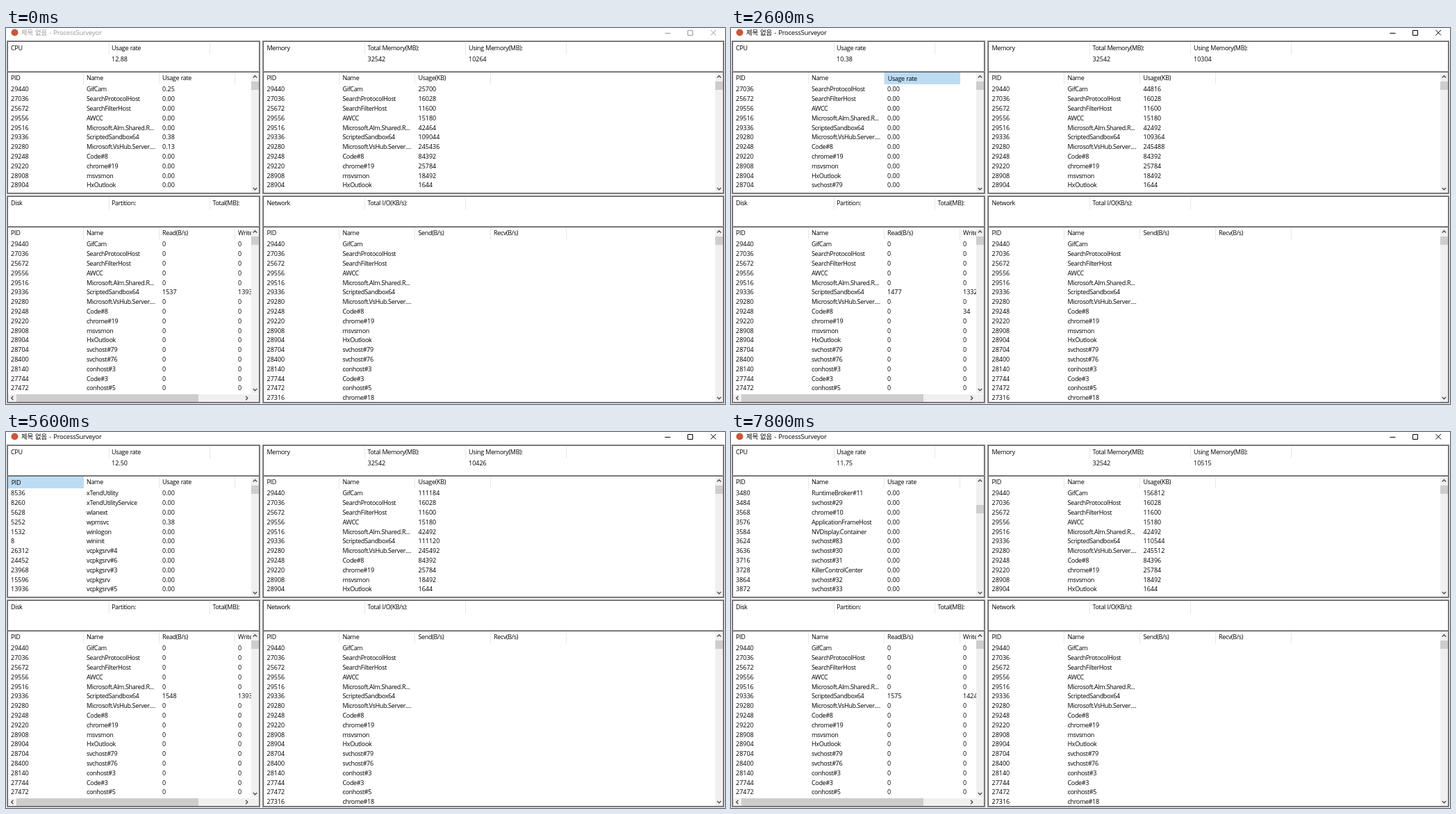
An HTML page that plays this animation: 1035 by 541 pixels, repeating every 8000 ms.

```html
<!DOCTYPE html>
<html lang="ko">
<head>
<meta charset="utf-8">
<title>ProcessSurveyor</title>
<style>
  html, body { margin: 0; width: 100%; height: 100%; overflow: hidden; background: #fff; }
  svg { display: block; width: 1035px; height: 541px; }
  text { font: 9px "Open Sans", "Noto Sans CJK KR", "Noto Sans CJK", sans-serif; fill: #000; letter-spacing: -.34px; word-spacing: .5px; white-space: pre; }
  text.num { letter-spacing: 0; }
  text.title { font-size: 9.4px; fill: inherit; letter-spacing: -.2px; word-spacing: 1px; }
</style>
</head>
<body>
<svg id="stage" viewBox="0 0 1035 541"></svg>
<script>
const LOOP = 8000, PITCH = 13.8;
const LEFT = [7, 116, 225, 334], RIGHT = [375.5, 484.5, 593.5, 702];

const parse = s => s.split('|').map(r => r.split(' '));

const procs = parse('29440 GifCam|27036 SearchProtocolHost|25672 SearchFilterHost|29556 AWCC|' +
  '29516 Microsoft.Alm.Shared.R...|29336 ScriptedSandbox64|29280 Microsoft.VsHub.Server....|' +
  '29248 Code#8|29220 chrome#19|28908 msvsmon|28904 HxOutlook|28704 svchost#79|28400 svchost#76|' +
  '28140 conhost#3|27744 Code#3|27472 conhost#5|27316 chrome#18');

const byPid = parse('0 _Total|4 System|8 wininit|172 Registry|660 smss|968 csrss#1|980 csrss|' +
  '992 svchost#64|1068 services|1088 lsass|1144 VsHub');
for (let i = 0; i < 38; i++) byPid.push([String(1160 + Math.floor(i * 15.4) * 4), 'svchost#' + (i % 29 || 65)]);
byPid.push(...parse('3480 RuntimeBroker#11|3484 svchost#29|3568 chrome#10|3576 ApplicationFrameHost|' +
  '3584 NVDisplay.Container|3624 svchost#83|3636 svchost#30|3716 svchost#31|3728 KillerControlCenter|' +
  '3864 svchost#32|3872 svchost#33|3880 svchost#34'));

const lists = {
  start: procs,
  usageUp: procs.slice(1),
  usageDown: [...parse('0 _Total|29440 GifCam|29336 ScriptedSandbox64|968 csrss#1'),
    ...procs.slice(1).filter(p => p[1] !== 'ScriptedSandbox64')],
  nameUp: parse('29556 AWCC|19924 AWCC.Background.Server|19804 ASDSvc#1|17088 AWCC.Service|12640 ACSCSRV|' +
    '10840 AnySign4PC|5972 AnySign4PCLauncher|5004 ASDSvc|3576 ApplicationFrameHost|29248 Code#8|' +
    '27744 Code#3|27160 Code#5'),
  nameDown: parse('8536 xTendUtility|8260 xTendUtilityService|5628 wlanext|5252 wpmsvc|1532 winlogon|' +
    '8 wininit|26312 vcpkgsrv#4|24452 vcpkgsrv#6|23968 vcpkgsrv#3|15596 vcpkgsrv|13936 vcpkgsrv#5|12088 vcpkgsrv#2'),
  pid: byPid
};

// cpu, used memory, memory of five processes, disk read, disk write, Code#8 write
const ticks = [
  ['12.88', 10264, 25700, 42464, 109044, 245436, 84392, 1537, 1393, 0],
  ['8.38', 10279, 32372, 42516, 108476, 245484, 84392, 1538, 1386, 0],
  ['10.38', 10304, 44816, 42492, 109364, 245488, 84392, 1477, 1332, 34],
  ['11.25', 10345, 67916, 42492, 109352, 245488, 84392, 1530, 1388, 0],
  ['11.88', 10386, 90440, 42492, 109328, 245488, 84392, 3067, 1940, 0],
  ['12.50', 10426, 111184, 42492, 111120, 245492, 84392, 1548, 1393, 0],
  ['11.75', 10447, 127772, 42492, 110760, 245508, 84396, 1552, 1410, 36],
  ['11.75', 10515, 156812, 42492, 110544, 245512, 84396, 1575, 1424, 0]
];
const busy = [
  { GifCam: '0.25', ScriptedSandbox64: '0.38', 'Microsoft.VsHub.Server....': '0.13' },
  { GifCam: '0.25', ScriptedSandbox64: '0.13' },
  { GifCam: '0.25' },
  { GifCam: '0.38', ScriptedSandbox64: '0.25', 'csrss#1': '0.13' },
  {},
  { wpmsvc: '0.38', 'csrss#1': '0.13' },
  { System: '0.13', 'csrss#1': '0.25' },
  { System: '0.13', 'csrss#1': '0.25' }
];

// hot: highlighted column of the CPU list (-1 none), down: mouse pressed
const steps = [
  [0, { tick: 0, disk: 0, list: 'start', hot: -1, down: false, top: false, active: false, off: 0 }],
  [300, { tick: 1 }],
  [400, { disk: 1 }],
  [1100, { top: true }],
  [1500, { top: false }],
  [1600, { active: true }],
  [1700, { tick: 2, hot: 2 }],
  [1800, { disk: 2, down: true }],
  [2000, { list: 'usageUp', down: false }],
  [2600, { down: true }],
  [2700, { list: 'usageDown', down: false, tick: 3 }],
  [2800, { disk: 3 }],
  [3300, { hot: 1 }],
  [3700, { down: true }],
  [3800, { list: 'nameUp', down: false }],
  [3900, { tick: 4 }],
  [4000, { disk: 4 }],
  [4300, { down: true }],
  [4400, { list: 'nameDown', down: false }],
  [5100, { tick: 5, hot: 0 }],
  [5200, { disk: 5 }],
  [5600, { down: true }],
  [5700, { list: 'pid', down: false }],
  [6200, { tick: 6 }],
  [6300, { disk: 6 }],
  [6700, { hot: -1 }],
  [6800, { off: 7 }],
  [6900, { off: 14 }],
  [7200, { off: 21 }],
  [7300, { off: 28 }],
  [7500, { off: 35, tick: 7, disk: 7 }],
  [7700, { off: 42 }],
  [7800, { off: 49 }]
];

const text = (x, y, s, cls = /^[\d.]+$/.test(s) ? 'num' : '') =>
  `<text x="${x}" y="${y + 3.4}" class="${cls}">${s}</text>`;
const rect = (x, y, w, h, fill) => `<rect x="${x}" y="${y}" width="${w}" height="${h}" fill="${fill}"/>`;
const path = (d, stroke, w) => `<path d="${d}" fill="none" stroke="${stroke}" stroke-width="${w}"/>`;
const seps = (xs, y) => xs.map(x => rect(x, y, 1, 17, '#e7e7e7')).join('');
const labels = (xs, y, names) => names.map((n, i) => text(xs[i], y, n)).join('');

function arrow(x, y, turn) {
  return `<g transform="translate(${x} ${y}) rotate(${turn})">${path('M-2.7 1.4L0-1.3L2.7 1.4', '#4d4d4d', 1.4)}</g>`;
}

function vbar(x, y0, y1, thumb) {
  return rect(x, y0, 11, y1 - y0, '#f0f0f0') + rect(x, thumb, 11, 12, '#cdcdcd') +
    arrow(x + 5.5, y0 + 6, 0) + arrow(x + 5.5, y1 - 5.5, 180);
}

// two-tone sunken edge around a header box and the list below it
function panel(x, y, w, h) {
  const box = (top, height) => rect(x, top, w, height, '#939393') +
    rect(x + 1, top + 1, w - 2, height - 2, '#5f5f5f') + rect(x + 2, top + 2, w - 4, height - 4, '#fff');
  return box(y, 46) + box(y + 44, h - 44);
}

function rows(xs, y, count, clip, cells) {
  let out = '';
  for (let i = 0; i < count; i++)
    cells(i).forEach((c, k) => out += text(xs[k], +(y + i * PITCH).toFixed(1), String(c)));
  return `<g clip-path="url(#${clip})">${out}</g>`;
}

function titleBar(active) {
  const ink = active ? '#000' : '#999';
  return rect(0, 0, 1035, 18, '#fff') + '<circle cx="12.5" cy="6.5" r="5" fill="#c9573a"/>' +
    `<g fill="${ink}">${text(22, 6.5, '제목 없음 - ProcessSurveyor', 'title')}</g>` +
    path('M948.5 7.5h8M981.5 3.5h7v7h-7zM1014.5 3l7.5 7.5M1022 3l-7.5 7.5', ink, 1);
}

function cpuPanel(s) {
  const usage = p => p[1] === '_Total' ? ticks[s.tick][0] : busy[s.tick][p[1]] || '0.00';
  const list = lists[s.list].slice(s.off);
  let head = seps([111, 220, 329], 64);
  if (s.hot >= 0) head += rect(3 + s.hot * 109, 64, 109, 17, s.down ? '#bcdcf4' : '#d9ebf9');
  ['PID', 'Name', 'Usage rate'].forEach((n, i) => {
    const d = s.down && s.hot === i ? .7 : 0;
    head += text(LEFT[i] + d, 72 + d, n);
  });
  return panel(1, 18, 365, 221) + seps([148, 293], 21) +
    (s.top ? rect(148, 20, 145, 18, '#d9ebf9') : '') +
    text(7, 28.5, 'CPU') + text(152, 28.5, 'Usage rate') + text(152, 44.5, ticks[s.tick][0]) + head +
    rows(LEFT, 88, 12, 'cpuClip', i => [...list[i], usage(list[i])]) +
    vbar(353, 64, 237, 77 + s.off * 4 / 7);
}

function memoryPanel(s) {
  const [, used, cam, alm, box, hub, code] = ticks[s.tick];
  const sizes = [cam, 16028, 11600, 15180, alm, box, hub, code, 25784, 18492, 1644, 9120];
  return panel(369, 18, 665, 221) + seps([516, 661, 806], 21) +
    labels([375.5, 520.5, 666], 28.5, ['Memory', 'Total Memory(MB):', 'Using Memory(MB):']) +
    text(520.5, 44.5, '32542') + text(666, 44.5, String(used)) +
    seps([479, 588, 697], 64) + labels(RIGHT, 72, ['PID', 'Name', 'Usage(KB)']) +
    rows(RIGHT, 88, 12, 'memClip', i => [...procs[i], sizes[i]]) + vbar(1021, 64, 237, 77);
}

function diskPanel(s) {
  const [read, write, code] = ticks[s.disk].slice(7);
  const io = i => i === 5 ? [read, write] : [0, i === 7 ? code : 0];
  return panel(1, 241, 365, 299) + seps([148, 293], 244) +
    labels([7, 152, 297.5], 251.5, ['Disk', 'Partition:', 'Total(MB):']) +
    seps([111, 220, 329], 287) +
    `<g clip-path="url(#diskClip)">${labels(LEFT, 295, ['PID', 'Name', 'Read(B/s)', 'Write(B/s)'])}</g>` +
    rows(LEFT, 311, 16, 'diskClip', i => [...procs[i], ...io(i)]) +
    vbar(353, 287, 526, 300) + rect(3, 527, 361, 11, '#f0f0f0') + rect(15, 527, 262, 11, '#cdcdcd') +
    arrow(9, 532.5, -90) + arrow(346.5, 532.5, 90);
}

function networkPanel() {
  return panel(369, 241, 665, 299) + seps([516, 661], 244) +
    labels([375.5, 520.5], 251.5, ['Network', 'Total I/O(KB/s):']) +
    seps([479, 588, 697, 806], 287) + labels(RIGHT, 295, ['PID', 'Name', 'Send(B/s)', 'Recv(B/s)']) +
    rows(RIGHT, 311, 17, 'netClip', i => procs[i]) + vbar(1021, 287, 538, 300);
}

const clip = (id, x, y, w, h) => `<clipPath id="${id}">${rect(x, y, w, h, '#000')}</clipPath>`;
const defs = `<defs>${clip('cpuClip', 3, 82, 350, 154)}${clip('memClip', 371, 82, 650, 154)}` +
  `${clip('diskClip', 3, 288, 350, 238)}${clip('netClip', 371, 288, 650, 250)}</defs>`;

const stage = document.getElementById('stage');
let shown = 0;

function frame(now) {
  const t = now % LOOP;
  const count = steps.filter(s => s[0] <= t).length;
  if (count !== shown) {
    shown = count;
    const s = Object.assign({}, ...steps.slice(0, count).map(st => st[1]));
    stage.innerHTML = defs + rect(0, 0, 1035, 541, '#f0f0f0') + titleBar(s.active) +
      cpuPanel(s) + memoryPanel(s) + diskPanel(s) + networkPanel();
  }
  requestAnimationFrame(frame);
}
frame(0);
</script>
</body>
</html>
```
